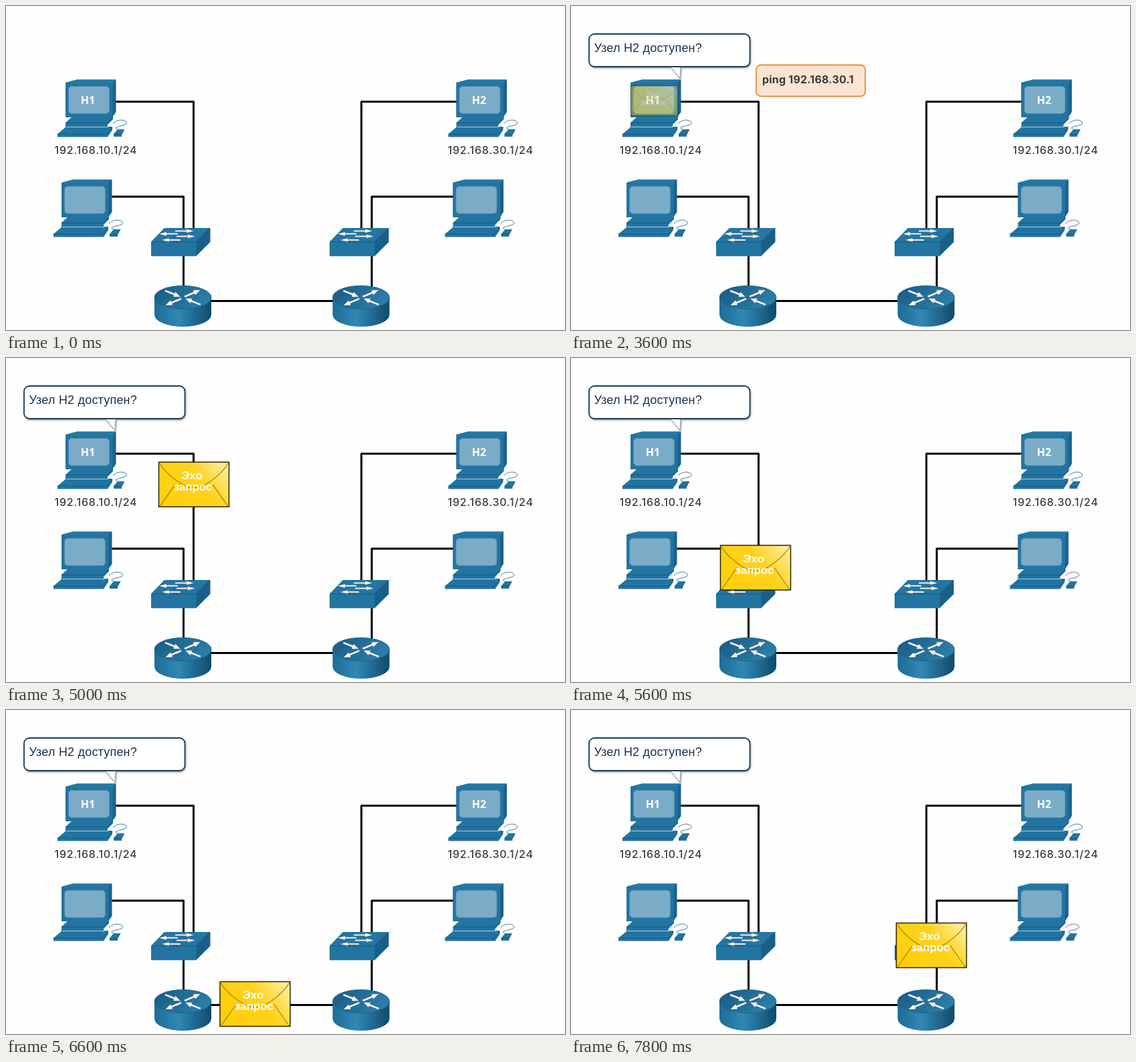
An HTML page that plays this animation: 836 px wide and 486 px high, repeating every 8 s.

```html
<!DOCTYPE html>
<html lang="ru">
<head>
<meta charset="utf-8">
<title>Ping</title>
<style>
  html, body { margin: 0; width: 100%; height: 100%; overflow: hidden; background: #fefefe; }
  svg { display: block; }
  text { font-family: Inter, "Noto Sans", sans-serif; }
  .wire { fill: none; stroke: #000; stroke-width: 3; stroke-linejoin: round; }
  .address { font-size: 16px; font-weight: 500; letter-spacing: .75px; fill: #3c3c3c; }
  .host { font: 700 16px "Noto Sans", sans-serif; fill: #fff; text-anchor: middle; }
  .question { font: 18px "Liberation Sans", Arial, sans-serif; letter-spacing: .2px; fill: #17324a; }
  .command { font-size: 16px; font-weight: 700; letter-spacing: .2px; fill: #3a3a3a; }
  .echo { font: bold 17px "Liberation Sans", Arial, sans-serif; fill: #fff; text-anchor: middle; }
  .fold { fill: none; stroke: #a57c00; stroke-width: 1.2; }
  .edge { fill: none; stroke: #135279; stroke-width: .8; }
</style>
</head>
<body>
<svg width="836" height="486" viewBox="0 0 836 486">
  <defs>
    <linearGradient id="drum">
      <stop offset="0" stop-color="#1d6c97"/>
      <stop offset=".42" stop-color="#3188b5"/>
      <stop offset="1" stop-color="#11496d"/>
    </linearGradient>
    <linearGradient id="lid" x2="1" y2=".4">
      <stop offset="0" stop-color="#185a82"/>
      <stop offset="1" stop-color="#2a7da8"/>
    </linearGradient>
    <linearGradient id="gold" y1=".7" x2="1" y2=".2">
      <stop offset="0" stop-color="#ffcf0a"/>
      <stop offset=".58" stop-color="#ffd21a"/>
      <stop offset="1" stop-color="#ffec98"/>
    </linearGradient>
    <filter id="soft" x="-10%" y="-20%" width="120%" height="150%">
      <feDropShadow dx="1" dy="1.5" stdDeviation="1.2" flood-color="#555" flood-opacity=".6"/>
    </filter>

    <!-- arrow of length 28 pointing right -->
    <path id="arrow" d="M0-1.3H17V-3.8L28 0L17 3.8V1.3H0Z" fill="#fff" stroke="#7d6a6c" stroke-width=".3"/>

    <g id="pc">
      <path d="M160 177C164 170 178 169 180.500 175C181 180 164 180 164 183C164 185 168 184 169 187" fill="none" stroke="#2d7297" stroke-width=".9"/>
      <path d="M161 192L167 185H177L173 193V196H161Z" fill="#2274a1"/>
      <path class="edge" d="M161 192.500H173L177 185"/>
      <path d="M89 175L98 167L160 164V170L152 178V182H89Z" fill="#2274a1"/>
      <path class="edge" d="M89 175.500H152L160 167"/>
      <path d="M77 192L90 181H159V186L152 196.500H77Z" fill="#2274a1"/>
      <path class="edge" d="M77 192H152L159 182"/>
      <path d="M90 181.500H153L159.500 174" fill="none" stroke="#d5e4ec" stroke-width=".8"/>
      <path d="M89 115L106 110.500H164.500V159L159 167H89Z" fill="#1a638d"/>
      <path d="M89 115L106 110.500H164.500L159.500 115.500Z" fill="#2578a5"/>
      <rect x="89" y="115" width="70.500" height="52" rx="1" fill="#2274a1"/>
      <rect x="93.500" y="120.500" width="61" height="41" rx="5" fill="#7bacc7" stroke="#4d8bae" stroke-width=".8"/>
    </g>

    <g id="switch">
      <path d="M217 354L237 333H305.500V354L284.500 375H217Z" fill="#195f88"/>
      <path d="M217 354L237 333H305.500L284.500 354Z" fill="#2475a2"/>
      <rect x="217" y="354" width="67.500" height="21.300" fill="#2274a1"/>
      <path class="edge" d="M217 354H284.500L305 333.500"/>
      <use href="#arrow" transform="translate(253 337.500) scale(1 .75)"/>
      <use href="#arrow" transform="translate(257 341.800) scale(-1 .75)"/>
      <use href="#arrow" transform="translate(255 345.500) scale(1 .75)"/>
      <use href="#arrow" transform="translate(261 351) scale(-1 .75)"/>
    </g>

    <g id="router">
      <path d="M222 437V463A42.500 18 0 0 0 307 463V437Z" fill="url(#drum)"/>
      <ellipse cx="264.500" cy="437" rx="42.500" ry="17.500" fill="url(#lid)" stroke="#1a5f88" stroke-width=".7"/>
      <use href="#arrow" transform="translate(238 427) rotate(22) scale(.88 1.050)"/>
      <use href="#arrow" transform="translate(267 436) rotate(-23) scale(.92 1.050)"/>
      <use href="#arrow" transform="translate(262 439) rotate(157) scale(.92 1.050)"/>
      <use href="#arrow" transform="translate(291 448) rotate(202) scale(.88 1.050)"/>
    </g>
  </defs>

  <rect width="836" height="486" fill="#fefefe"/>
  <g class="wire">
    <path d="M160 143.500H280.500V336"/>
    <path d="M154 286H265.500V425"/>
    <path d="M300 442.500H495"/>
    <path d="M677 143.500H531.500V336"/>
    <path d="M672 286H547V425"/>
  </g>

  <use href="#pc"/>
  <use href="#pc" x="-6" y="150"/>
  <use href="#pc" x="584.500"/>
  <use href="#pc" x="579.500" y="150"/>
  <use href="#switch"/>
  <use href="#switch" x="267"/>
  <use href="#router"/>
  <use href="#router" x="266.500"/>

  <text class="host" x="122.500" y="147">H1</text>
  <text class="host" x="707.500" y="147">H2</text>
  <text class="address" x="72.500" y="222">192.168.10.1/24</text>
  <text class="address" x="660.500" y="222">192.168.30.1/24</text>

  <g id="bubble">
    <g filter="url(#soft)">
      <path d="M148 90L163 108.500L164 90Z" fill="#fff" stroke="#999" stroke-width="1"/>
      <rect x="27" y="42" width="240.500" height="49" rx="8" fill="#fff" stroke="#173f5c" stroke-width="1.800"/>
    </g>
    <path d="M150 92L162 106L163 92Z" fill="#fff"/>
    <text class="question" x="34.500" y="69">Узел H2 доступен?</text>
  </g>

  <g id="ping">
    <rect x="277" y="88.500" width="163" height="47" rx="7" fill="#fde4d2" stroke="#e58f3d" stroke-width="1.800"/>
    <text class="command" x="286" y="116">ping 192.168.30.1</text>
  </g>

  <g id="mail">
    <rect x="-52.500" y="-33.500" width="105" height="67" fill="url(#gold)" stroke="#2b2407" stroke-width="1.500"/>
    <path class="fold" d="M-52-33C-43-17-24-3-13 2Q0 8 13 2C24-3 43-17 52-33M-51 33L-28 0M51 33L28 0"/>
    <text class="echo" x="-3" y="-8">Эхо</text>
    <text class="echo" x="-1.500" y="9">запрос</text>
  </g>
</svg>

<script>
  const LOOP = 8000, STEP = 200;
  const BUBBLE_IN = 200, PING_IN = 1800, PING_OUT = 5000, MAIL_IN = 3600;

  // time, x, y, scale, opacity
  const route = [
    [3600, 124.5, 142, .67, .4],
    [4000, 124.5, 143, 1, 1],
    [4400, 195, 148, 1, 1],
    [4800, 281, 148, 1, 1],
    [5500, 281, 294, 1, 1],
    [5600, 276, 314.5, 1, 1],
    [5800, 267, 358, 1, 1],
    [6140, 265, 441, 1, 1],
    [6600, 372.5, 441, 1, 1],
    [7400, 547, 441, 1, 1],
    [7700, 546, 371, 1, 1],
    [7800, 539, 353, 1, 1],
    [8000, 532, 312, 1, 1]
  ];

  const part = id => document.getElementById(id);
  const bubble = part('bubble'), ping = part('ping'), mail = part('mail');
  const show = (node, on) => node.setAttribute('visibility', on ? 'visible' : 'hidden');

  function poseAt(t) {
    const i = Math.max(1, route.findIndex(p => p[0] >= t));
    const a = route[i - 1], b = route[i];
    const k = (t - a[0]) / (b[0] - a[0]);
    return a.map((v, j) => v + (b[j] - v) * k);
  }

  function draw(ms) {
    const t = Math.floor((ms % LOOP) / STEP) * STEP;
    show(bubble, t >= BUBBLE_IN);
    show(ping, t >= PING_IN && t < PING_OUT);
    show(mail, t >= MAIL_IN);
    if (t < MAIL_IN) return;
    const [, x, y, scale, opacity] = poseAt(t);
    mail.setAttribute('transform', `translate(${x} ${y}) scale(${scale})`);
    mail.setAttribute('opacity', opacity);
  }

  const start = performance.now();
  function tick() {
    draw(performance.now() - start);
    requestAnimationFrame(tick);
  }
  tick();
</script>
</body>
</html>
```
